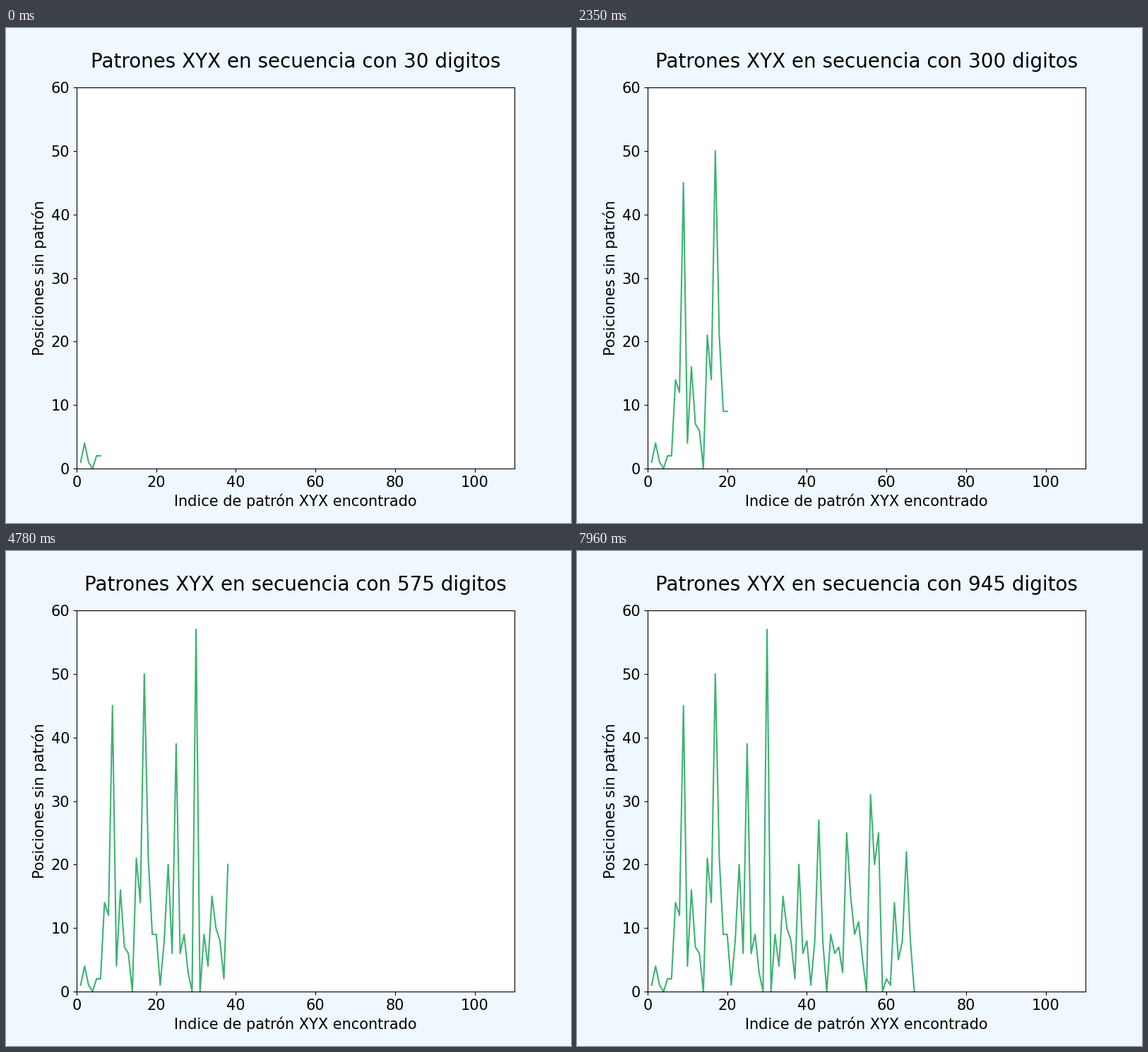
Write a matplotlib script that moves like this. It is 800 by 700 pixels and loops after 8 s.

```python
import matplotlib.pyplot as plt
from matplotlib.animation import FuncAnimation

LOOP_MS = 8000
FRAMES = 184
START, STEP = 30, 5


def arctan_inv(n, unit):
    """Integer arctan(1/n) scaled by unit."""
    term = unit // n
    total, k, sign = term, 1, 1
    while term:
        term //= n * n
        k += 2
        sign = -sign
        total += sign * (term // k)
    return total


def pi_digits(count):
    unit = 10 ** (count + 10)
    value = 4 * (4 * arctan_inv(5, unit) - arctan_inv(239, unit))
    return str(value)[:count]


def find_patterns(digits):
    """Gaps before each non-overlapping XYX and the position where it ends."""
    gaps, ends = [], []
    i = last = 0
    while i + 2 < len(digits):
        if digits[i] == digits[i + 2]:
            gaps.append(i - last)
            i += 3
            last = i
            ends.append(i)
        else:
            i += 1
    return gaps, ends


gaps, ends = find_patterns(pi_digits(START + STEP * FRAMES))

fig, ax = plt.subplots(figsize=(8, 7), dpi=100, facecolor="aliceblue")
fig.subplots_adjust(left=0.125, right=0.9, bottom=0.11, top=0.88)
ax.set_xlim(0, 110)
ax.set_ylim(0, 60)
ax.tick_params(labelsize=15)
ax.set_xlabel("Indice de patrón XYX encontrado", fontsize=15)
ax.set_ylabel("Posiciones sin patrón", fontsize=15)
title = ax.set_title("", fontsize=20, pad=20)
line, = ax.plot([], [], color="mediumseagreen", lw=1.5)


def update(frame):
    count = START + STEP * frame
    found = sum(end < count for end in ends)
    line.set_data(range(1, found + 1), gaps[:found])
    title.set_text(f"Patrones XYX en secuencia con {count} digitos")
    return line, title


anim = FuncAnimation(fig, update, frames=FRAMES, interval=LOOP_MS / FRAMES,
                     init_func=lambda: update(0), repeat=True, repeat_delay=0)
plt.show()
```
